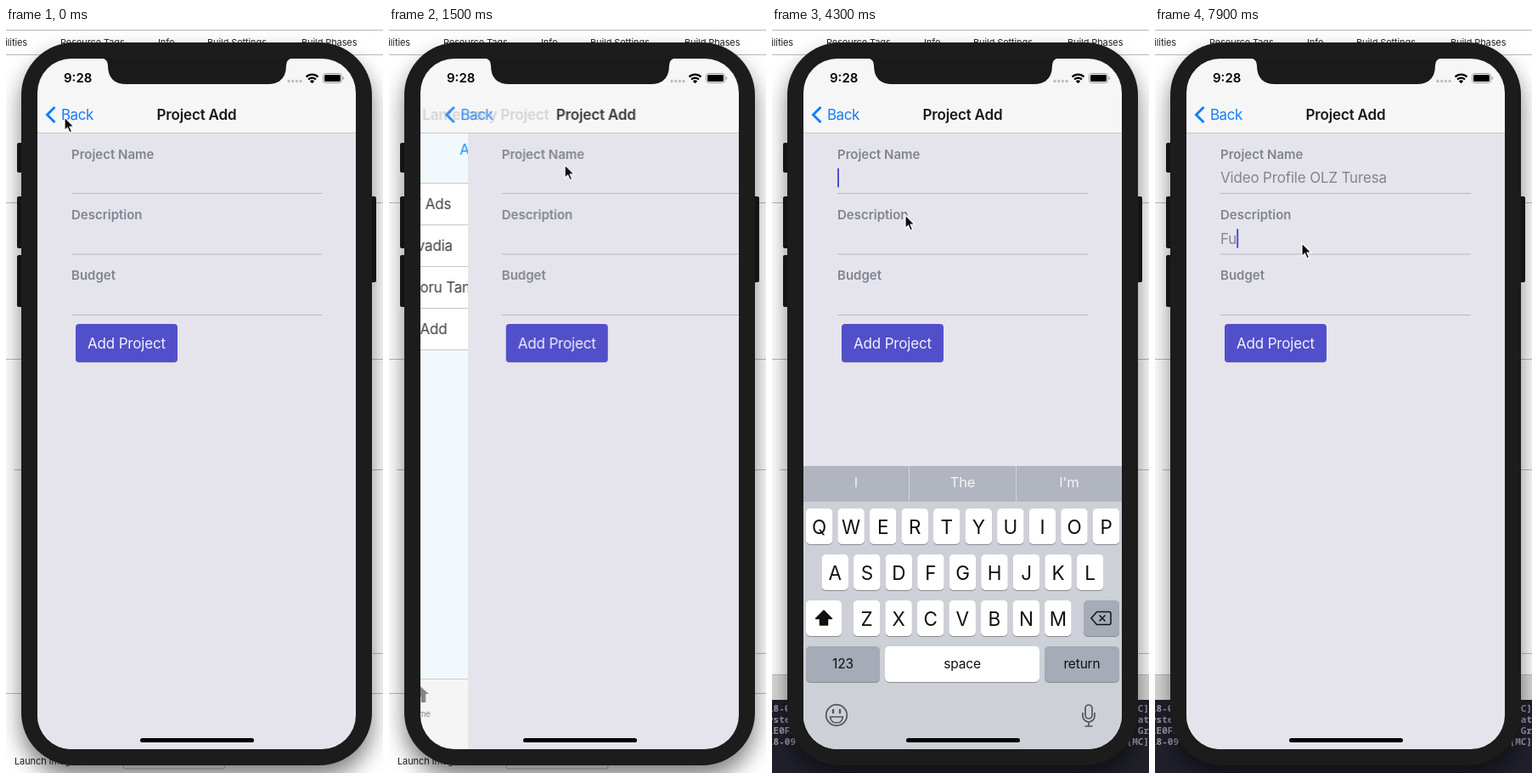
An HTML page for the animation above (8 s loop, 444 by 876 pixels).

```html
<!DOCTYPE html>
<html lang="en">
<head>
<meta charset="utf-8">
<title>Project form</title>
<style>
html, body { margin: 0; width: 100%; height: 100%; overflow: hidden; background: #fff; }
svg { display: block; width: 444px; height: 876px; }
text { font: 17px Inter, sans-serif; letter-spacing: -.17px; white-space: pre; }
.mid { text-anchor: middle; }
.title { font-weight: 600; fill: #18181a; }
.small { font-size: 11px; letter-spacing: -.1px; }
.label { font-size: 15px; font-weight: 600; letter-spacing: 0; fill: #7f8590; }
.input { fill: #82858e; }
.tab { font-size: 10px; letter-spacing: -.05px; }
.log text { font: bold 11px "Noto Sans Mono", monospace; letter-spacing: 0; fill: #9c9ca8; }
.line { stroke: #b9b8be; }
.sug { font-size: 16.5px; fill: #f3f4f6; }
.word { font-size: 15.5px; fill: #111; }

.form, .list, .formHead, .listHead, .keys, .cursor, .log, .link {
  animation: 8s infinite cubic-bezier(.2,.75,.25,1) both;
}
.form { animation-name: form; }
.list { animation-name: list; }
.formHead { animation-name: formHead; }
.listHead { animation-name: listHead; }
.link { animation-name: link; }
.log { animation-name: log; animation-timing-function: step-end; }
.keys { animation-name: keys; animation-timing-function: cubic-bezier(.38,.7,.125,1); }
.cursor { animation-name: cursor; animation-timing-function: ease-in-out; }
@keyframes form {
  0%, 1.9%, 22%, 100% { transform: translateX(0); }
  6.9%, 16.9% { transform: translateX(375px); }
}
@keyframes list {
  0%, 1.9%, 22%, 100% { transform: translateX(-112px); }
  6.9%, 16.9% { transform: translateX(0); }
}
@keyframes formHead {
  0%, 1.9%, 22%, 100% { transform: translateX(0); opacity: 1; }
  6.9%, 16.9% { transform: translateX(130px); opacity: 0; }
}
@keyframes listHead {
  0%, 1.9%, 22%, 100% { transform: translateX(-130px); opacity: 0; }
  6.9%, 16.9% { transform: translateX(0); opacity: 1; }
}
@keyframes link {
  0%, 14.4%, 20.5%, 100% { opacity: 1; }
  15.6%, 17.5% { opacity: .25; }
}
@keyframes log {
  0% { visibility: hidden; }
  22.5%, 100% { visibility: visible; }
}
@keyframes keys {
  0%, 23.925% { transform: translateY(333px); }
  28.925%, 89.5% { transform: translateY(0); }
  93.5%, 100% { transform: translateY(333px); }
}
@keyframes cursor {
  0%, 3% { transform: translate(69px,105px); }
  12%, 17.2% { transform: translate(219px,154px); }
  22.3%, 26% { transform: translate(158px,189px); }
  30%, 86.5% { transform: translate(157px,220px); }
  89.2%, 100% { transform: translate(173px,253px); }
}
</style>
</head>
<body>
<svg viewBox="0 0 444 876">
  <defs>
    <clipPath id="screen"><rect x="37" y="36" width="375" height="812" rx="40"/></clipPath>
    <filter id="shade" x="-20%" y="-10%" width="140%" height="120%">
      <feDropShadow dx="0" dy="14" stdDeviation="13" flood-opacity=".5"/>
    </filter>
  </defs>

  <!-- desktop window behind the phone -->
  <rect width="444" height="876" fill="#fff"/>
  <path class="line" d="M0 2.5H444M0 31.5H444M0 205.5H444M0 389.5H444M9 519.5H444M432 735.5H444M0 782.5H444"/>
  <g fill="#222">
    <text class="small" x="25" y="21" text-anchor="end">Capabilities</text>
    <text class="small" x="64" y="21">Resource Tags</text>
    <text class="small" x="179" y="21">Info</text>
    <text class="small" x="237" y="21">Build Settings</text>
    <text class="small" x="348" y="21">Build Phases</text>
    <text class="small" x="10" y="866">Launch Images Source</text>
  </g>
  <rect x="138" y="852" width="120" height="19" rx="3" fill="#fff" stroke="#bbb"/>
  <g class="log">
    <path d="M0 760H444V790H0z" fill="#d9d9da"/>
    <path class="line" d="M0 760.5H444"/>
    <path d="M0 790H444V876H0z" fill="#20202c"/>
    <text x="-5" y="804">18-09</text><text x="444" y="804" text-anchor="end">[MC]</text>
    <text x="-5" y="817">ystem</text><text x="444" y="817" text-anchor="end">at</text>
    <text x="-5" y="830">1E0F5</text><text x="444" y="830" text-anchor="end">Gr</text>
    <text x="-5" y="843">18-09</text><text x="444" y="843" text-anchor="end">[MC]</text>
  </g>

  <!-- phone body -->
  <g fill="#1a1a1b">
    <path d="M13 137q0-2 2-2h5v35h-5q-2 0-2-2zM13 200q0-2 2-2h5v61h-5q-2 0-2-2zM13 269q0-2 2-2h5v61h-5q-2 0-2-2zM436 200q0-2-2-2h-5v101h5q2 0 2-2z"/>
    <rect x="18" y="17" width="413" height="850" rx="62" filter="url(#shade)"/>
  </g>

  <g clip-path="url(#screen)">
    <g class="list">
      <rect x="37" y="123" width="375" height="725" fill="#f2f9fd"/>
      <text class="mid link" x="224.5" y="149" fill="#0a84ff">Add Project</text>
      <g id="rows"></g>
      <rect x="37" y="766" width="375" height="82" fill="#f5f5f5"/>
      <path d="M37 765.5H412" stroke="#cdcdd1"/>
      <path d="M130.500 772.500l11.500 10.500h-3.500v10h-5.500v-6.500h-5v6.500h-5.500v-10h-3.500z" fill="#858585"/>
      <text class="mid tab" x="130.500" y="810" fill="#858585">Home</text>
      <path d="M307.500 778h3m2.500 0h16m-21.500 5h3m2.500 0h16m-21.500 5h3m2.500 0h16" stroke="#2a6fe9" stroke-width="2.400"/>
      <text class="mid tab" x="318" y="810" fill="#2a6fe9">Project List</text>
    </g>

    <g class="form">
      <rect x="37" y="123" width="375" height="725" fill="#e5e4ec"/>
      <path class="line" d="M77 194.500H372M77 266H372M77 337.500H372"/>
      <text class="label" x="77" y="154">Project Name</text>
      <text class="label" x="77" y="225">Description</text>
      <text class="label" x="77" y="296">Budget</text>
      <text class="input" id="name" x="77" y="182"></text>
      <text class="input" id="desc" x="77" y="253.500"></text>
      <rect id="caret" y="164.500" width="2" height="23" rx="1" fill="#4a4fd8"/>
      <rect x="82" y="349" width="120" height="45" rx="4" fill="#000" opacity=".1"/>
      <rect x="82" y="348" width="120" height="45" rx="4" fill="#524fcb"/>
      <text class="mid" x="142" y="376.500" fill="#f1f1fa">Add Project</text>
    </g>

    <rect x="37" y="36" width="375" height="87" fill="#f6f6f6"/>
    <path d="M37 123.500H412" stroke="#c6c6ca"/>
    <text class="mid title listHead" x="224.500" y="107.500">Lanternary Project</text>
    <g class="formHead">
      <text class="mid title" x="224.500" y="107.500">Project Add</text>
      <path d="M57.500 93l-9 9 9 9" fill="none" stroke="#157efb" stroke-width="3"/>
      <text x="65" y="108" fill="#157efb" style="letter-spacing:-.5px">Back</text>
    </g>

    <g class="keys" id="keys">
      <rect x="37" y="515" width="375" height="333" fill="#cdd0d7"/>
      <rect x="37" y="515" width="375" height="42" fill="#b0b5bf"/>
      <path d="M161.500 515V557M287.500 515V557" stroke="#d0d3d9"/>
      <g id="sugs"></g>
      <g fill="none" stroke="#50555c" stroke-width="1.700">
        <circle cx="76" cy="808" r="12.300"/>
        <path d="M68.500 810h15q-1 7-7.500 7t-7.500-7zM369 800a4 4 0 0 1 8 0v8a4 4 0 0 1-8 0zM366 805v4a7 7 0 0 0 14 0v-4M373 816v5M368.500 821h9"/>
        <path d="M72 802v3M80 802v3" stroke-width="2.400" stroke-linecap="round"/>
      </g>
    </g>

    <rect x="158" y="835" width="134" height="5" rx="2.500"/>
    <text x="68" y="64" style="font-size:15px;font-weight:600;letter-spacing:0">9:28</text>
    <path d="M333 62.500h16" stroke="#bdbdbf" stroke-width="3.400" stroke-linecap="round" stroke-dasharray="0 4.700"/>
    <path d="M353.500 57.500a10 10 0 0 1 14 0M356 60.500a6.500 6.500 0 0 1 9 0" fill="none" stroke="#000" stroke-width="2.200"/>
    <path d="M357.800 62.500a4 4 0 0 1 5.400 0l-2.700 2.700z"/>
    <rect x="373.500" y="53.500" width="22" height="11" rx="3" fill="none" stroke="#9a9a9c"/>
    <rect x="375" y="55" width="19" height="8" rx="1.600"/>
    <path d="M396.800 57v4q1.400-.6 1.400-2t-1.400-2z" fill="#9a9a9c"/>
  </g>
  <path d="M112 35.500q8 .5 8 8.500q0 22 22 22H308q22 0 22-22q0-8 8-8.500z" fill="#1a1a1b"/>

  <path class="cursor" d="M0 0V15.500L3.500 12.200L6 18L8.600 16.900L6.200 11.200H11z" stroke="#fff" stroke-width="1.200" fill="#0c0c0c"/>
</svg>

<script>
const $ = id => document.getElementById(id);
function add(parent, tag, attrs, text = '') {
  const el = document.createElementNS('http://www.w3.org/2000/svg', tag);
  for (const k in attrs) el.setAttribute(k, attrs[k]);
  el.textContent = text;
  return parent.appendChild(el);
}

// project list
['Iklan VNT Ads', 'Profil Tervadia', 'Profil Midoru Tanavira', 'Test App Add'].forEach((name, i) => {
  const y = 182 + 49 * i, rows = $('rows');
  add(rows, 'rect', { x: 37, y, width: 375, height: 49, fill: '#fff' });
  add(rows, 'path', { d: `M37 ${y + .5}H412m-375 49H412`, stroke: '#c6c6ca' });
  add(rows, 'text', { x: 57, y: y + 31, fill: '#3f3f45' }, name);
  add(rows, 'path', { d: `M385 ${y + 19}l6 6-6 6`, fill: 'none', stroke: '#bcbcc2', 'stroke-width': 2.3 });
});

// keyboard
const keys = $('keys'), GRAY = '#a5abb7';
function key(x, y, width, fill = '#fff') {
  add(keys, 'rect', { x, y: y + 1, width, height: 42, rx: 5, fill: '#898c93' });
  return add(keys, 'rect', { x, y, width, height: 42, rx: 5, fill });
}
const letters = [];
[['QWERTYUIOP', 39.8], ['ASDFGHJKL', 58.5], ['ZXCVBNM', 95.8]].forEach(([row, x], r) =>
  [...row].forEach((c, i) => {
    const kx = x + 37.55 * i, y = 565 + 54 * r;
    key(kx, y, 31.5);
    letters.push({ c, y, el: add(keys, 'text', { class: 'mid', x: kx + 15.75, fill: '#111' }) });
  }));
const shift = key(40, 673, 42);
const arrow = add(keys, 'path', { d: 'M61 685l9.5 9.500h-5v7.500h-9v-7.500h-5z', stroke: '#111', 'stroke-width': 1.500, 'stroke-linejoin': 'round' });
key(367, 673, 42, GRAY);
add(keys, 'path', {
  d: 'M376 694l6.500-7.500h14.500q2 0 2 2v11q0 2-2 2H382.500zM385.500 690.500l7 7m0-7l-7 7',
  fill: 'none', stroke: '#111', 'stroke-width': 1.500
});
[['123', 40, 87, GRAY], ['space', 133, 182], ['return', 321, 88, GRAY]].forEach(([label, x, w, fill]) => {
  key(x, 727, w, fill);
  add(keys, 'text', { class: 'mid word', x: x + w / 2, y: 753 }, label);
});

let lower;
function setCase(low) {
  if (low === lower) return;
  lower = low;
  for (const { c, y, el } of letters) {
    el.textContent = low ? c.toLowerCase() : c;
    el.style.fontSize = low ? '24px' : '22.5px';
    el.setAttribute('y', y + (low ? 28 : 29.5));
  }
  shift.setAttribute('fill', low ? GRAY : '#fff');
  arrow.setAttribute('fill', low ? 'none' : '#111');
}

// suggestion bar: start time, then three words
const sugs = [99, 224.5, 350].map(x => {
  const el = add($('sugs'), 'text', { class: 'mid sug', x, y: 540 });
  return [add(el, 'tspan', {}), add(el, 'tspan', {})];
});
const HINTS = [
  [0, '', '', ''], [2350, 'I', 'The', "I'm"], [4420, '“V”', 'Very', 'Via'],
  [4600, '“Vid”', 'Video', 'Videos'], [4845, 'is', 'of', 'and'], [4960, '“Pro”', 'Profile', 'Program'],
  [5500, '“Profile”', 'Profile', 'Profiles'], [5560, 'of', 'is', 'and'], [5900, '“O”', 'One', 'Or'],
  [6320, '“OLZ”', 'Old', 'Oz'], [6450, 'and', 'is', 'the'], [6600, '“Tu”', 'Turn', 'Tune']
];
function setHints(t) {
  const [start, ...words] = HINTS.filter(h => h[0] <= t).pop();
  sugs.forEach(([head, tail], i) => {
    const cut = start === 5900 ? words[i].length - 1 : words[i].length;
    head.textContent = words[i].slice(0, cut);
    tail.textContent = words[i].slice(cut);
    tail.setAttribute('opacity', .4);
  });
}

// typing
const NAME = 'Video Profile OLZ Turesa', DESC = 'Fu';
const typeAt = [...NAME].map((c, i) =>
  i < 12 ? 4420 + 85 * i : i < 18 ? [5500, 5560, 5850, 6130, 6320, 6450][i - 12] : 6530 + 75 * (i - 18));
const typed = t => typeAt.filter(a => a <= t).length;
const clamp = v => Math.max(0, Math.min(1, v));

function draw(t) {
  const n = typed(t), inDesc = t >= 7180;
  $('name').textContent = NAME.slice(0, n);
  $('desc').textContent = DESC.slice(0, (t >= 7620) + (t >= 7780));
  const field = inDesc ? $('desc') : $('name');
  const w = field.textContent ? field.getComputedTextLength() : 0;
  const caret = $('caret'), p = (t - 2000 + 1000) % 1000;
  const blink = p < 450 ? 1 : p < 700 ? clamp((600 - p) / 150) : clamp((p - 720) / 130);
  caret.setAttribute('x', 77 + w);
  caret.setAttribute('y', inDesc ? 236 : 164.5);
  caret.setAttribute('opacity', t < 1850 ? 0 : t >= 4420 ? 1 : blink);
  setCase(t >= 4420);
  setHints(t);
}

let begin;
function tick(now) {
  begin ??= now;
  draw((now - begin) % 8000);
  requestAnimationFrame(tick);
}
draw(0);
requestAnimationFrame(tick);
</script>
</body>
</html>
```
